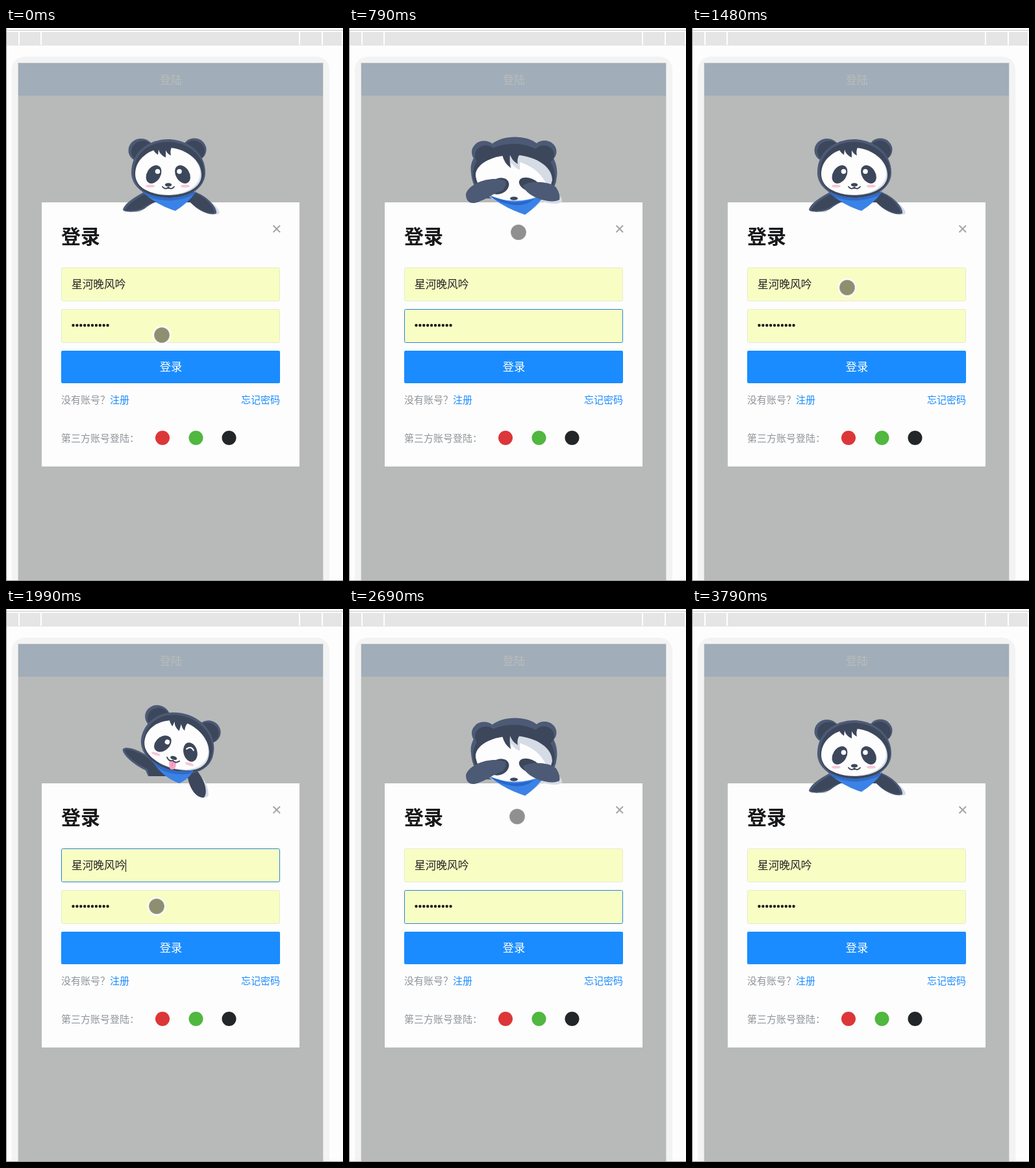
Recreate the animation shown at these times as an HTML page. Size 519 px wide and 850 px high, loop 4.17 s.

```html
<!DOCTYPE html>
<html lang="zh-CN">
<head>
<meta charset="utf-8">
<title>登录</title>
<style>
html, body { margin: 0; width: 100%; height: 100%; overflow: hidden; background: #fdfdfd; }
svg { display: block; width: 519px; height: 850px; }
text { font: 15px "Noto Sans CJK SC", "Noto Sans CJK", sans-serif; fill: #8f9499; }
.blue { fill: #1a8bff; }
.field { fill: #f8fdc3; stroke: #e6ebd0; }
.field.on { stroke: #2685d8; }
.dark { fill: #3d475b; }
.mid { fill: #4c5a75; }
.white { fill: #fdfdfe; }
.scarf { fill: #3b82e6; }
.shade { fill: #d5dce6; }
.pink { fill: #f9c6d8; }
.line { fill: none; stroke: #30394b; stroke-width: 1.7; stroke-linecap: round; }
</style>
</head>
<body>
<svg viewBox="0 0 519 850">
  <defs>
    <g id="skull">
      <ellipse class="mid" cx="208" cy="188" rx="19.5" ry="18"/>
      <ellipse class="mid" cx="290" cy="187" rx="18.5" ry="17.5"/>
      <ellipse class="dark" cx="211" cy="190" rx="18" ry="16.5"/>
      <ellipse class="dark" cx="289" cy="189" rx="17" ry="16"/>
      <path class="mid" d="M193 222C193 189 221 171 250 171S307 191 307 222C307 246 282 262 250 262S193 246 193 222Z"/>
      <path class="dark" d="M197 222C197 191 222 175 250 175S305 194 305 222C305 246 280 261 250 261S197 246 197 222Z"/>
      <path class="shade" d="M202 222C202 200 224 185 250 185S301 202 301 226C301 246 277 257 250 257S202 246 202 222Z"/>
      <path class="white" d="M199 224C199 201 222 184 249 184S299 203 299 223C299 244 276 256 249 256S199 246 199 224Z"/>
      <path class="dark" d="M225 180Q226 190 234 195L235 187Q237 195 246 199L246 188Q249 194 254 196Q252 189 256 181Z"/>
      <ellipse class="dark" cx="227.500" cy="225" rx="10.500" ry="15" transform="rotate(32 227.500 225)"/>
      <ellipse class="dark" cx="272" cy="225" rx="10.500" ry="15" transform="rotate(-32 272 225)"/>
      <circle class="white" cx="233.500" cy="220.500" r="3.800"/>
      <ellipse class="pink" cx="222" cy="243" rx="7" ry="2.300"/>
      <ellipse class="pink" cx="276" cy="243" rx="7" ry="2.300"/>
      <ellipse class="dark" cx="250" cy="241" rx="5.200" ry="2.800"/>
    </g>
  </defs>

  <path fill="#e5e5e5" d="M1 6H519V27H1Z"/>
  <path stroke="#c6c6c6" d="M0 3.500H519"/>
  <path stroke="#fff" stroke-width="2" d="M20 5V26M54 5V26M452 5V26M487 5V26M518 5V26"/>
  <rect x="9" y="44" width="489" height="900" rx="20" fill="#f3f3f3"/>
  <rect x="18.500" y="53.500" width="470" height="900" fill="#b8bab9" stroke="#dedede"/>
  <path fill="#a1adb8" d="M19 54H488V104H19Z"/>
  <text x="254" y="86" text-anchor="middle" style="font-size:17px;fill:#b9bcbd">登陆</text>
  <path stroke="#8d8d8d" d="M.500 0V850M0 849.500H519"/>

  <path fill="#fdfdfd" d="M55 268H452V674H55Z"/>
  <text x="85" y="331" style="font-size:30px;font-weight:700;fill:#17181a">登录</text>
  <path stroke="#a3a5a7" stroke-width="2" d="M411.500 303.500L422 314M422 303.500L411.500 314"/>
  <rect id="user" class="field" x="85.500" y="368.500" width="336" height="51" rx="2"/>
  <text x="101" y="400" style="font-size:16.700px;fill:#222">星河晚风吟</text>
  <rect id="pass" class="field" x="85.500" y="432.500" width="336" height="51" rx="2"/>
  <path fill="none" stroke="#1d1d1d" stroke-width="4.400" stroke-linecap="round" stroke-dasharray="0 5.900" d="M103.500 457H157"/>
  <path id="caret" stroke="#111"/>
  <rect x="85" y="496" width="337" height="50" rx="2" fill="#1a8cff"/>
  <text x="254" y="527" text-anchor="middle" style="font-size:17.300px;fill:#fff">登录</text>
  <text x="85" y="577">没有账号？<tspan class="blue" x="160">注册</tspan></text>
  <text class="blue" x="422" y="577" text-anchor="end">忘记密码</text>
  <text x="85" y="636">第三方账号登陆：</text>
  <circle cx="241" cy="630" r="11" fill="#dc3638"/>
  <circle cx="292.500" cy="630" r="11" fill="#50b73f"/>
  <circle cx="343.500" cy="630" r="11" fill="#232628"/>

  <g id="rest">
    <path class="shade" d="M292 258C315 263 329 277 329 285Q324 289 309 284L188 283Q207 284 222 268Z"/>
    <path fill="#fdfdfd" d="M225 268H287L309 284H205Z"/>
    <path class="mid" d="M213 252C195 261 182 271 180 279C180 284 203 284 213 278Q222 271 229 268H284C298 283 315 289 324 285C326 277 312 260 292 252Z"/>
    <path class="dark" d="M216 254C199 263 188 271 183 280C195 282 207 279 213 275Q222 269 229 268H284C297 280 312 286 321 284C320 275 309 261 292 254Z"/>
    <use href="#skull"/>
    <circle class="white" cx="267" cy="220.500" r="3.800"/>
    <path class="line" d="M241 244Q245 249 250 245Q255 249 259 244"/>
    <path class="scarf" d="M209 251Q250 271 293 251Q283 267 261 281Q231 272 209 251Z"/>
    <path fill="#2e6cc9" d="M209 251Q250 271 293 251L288 257Q250 273 217 258Z"/>
  </g>

  <g id="greet">
    <path class="shade" d="M286 250Q310 257 312 285Q311 291 303 290Z"/>
    <path class="mid" d="M226 231C211 220 188 209 180 215C177 223 199 241 215 248L219 257H257L274 240Z"/>
    <path class="dark" d="M226 234C211 223 191 214 183 216C184 226 203 239 218 246L221 257H257L270 240Z"/>
    <path class="dark" d="M279 253C281 273 291 290 304 290C311 286 309 265 292 246Z"/>
    <g transform="translate(15.500 -11) rotate(17 250 216)">
      <use href="#skull"/>
      <path d="M265 222Q270 215 276 221" fill="none" stroke="#fff" stroke-width="2" stroke-linecap="round"/>
      <path d="M245 246Q250 244 256 246L257 253Q256 259 251 259Q246 257 245 246Z" fill="#f6a5c6"/>
      <path class="line" d="M240 243Q245 249 250 245Q255 249 260 243"/>
      <path stroke="#dc7ca8" d="M251 248V254"/>
    </g>
    <path class="scarf" d="M225 233Q249 254 289 248Q282 261 267 268Q241 259 225 233Z"/>
    <path fill="#2e6cc9" d="M225 233Q249 254 289 248L285 253Q253 258 231 242Z"/>
  </g>

  <g id="cover">
    <path class="shade" d="M301 244Q330 256 328 267Q321 273 297 267L272 287L263 280Z"/>
    <path class="mid" d="M188 222C185 203 199 185 219 179C237 164 273 164 290 178C310 185 323 206 320 229Q318 253 298 262H211Q190 250 188 222Z"/>
    <ellipse class="mid" cx="208" cy="191" rx="19" ry="17.500"/>
    <ellipse class="mid" cx="301" cy="190" rx="18.500" ry="17"/>
    <ellipse class="dark" cx="211" cy="196" rx="17" ry="15.500"/>
    <ellipse class="dark" cx="300" cy="195" rx="16" ry="14.500"/>
    <path class="dark" d="M191 225C191 198 220 178 254 178S317 200 317 229Q315 251 299 260H213Q193 248 191 225Z"/>
    <path class="shade" d="M195 225C197 207 225 195 253 195S313 210 313 234Q308 259 274 268Q250 274 226 265Q197 251 195 225Z"/>
    <path class="white" d="M195 226C196 209 219 198 239 197Q242 211 250 216L250 207Q254 215 263 218L263 206Q291 215 303 238Q303 255 276 264Q251 268 228 262Q198 251 195 226Z"/>
    <path class="dark" d="M224 193Q232 197 236 195Q239 208 249 215Q247 208 248 195Q252 205 260 209Q258 201 263 194L278 198L263 184H237Z"/>
    <path class="scarf" d="M213 255Q250 276 302 256Q290 274 271 287Q237 276 213 255Z"/>
    <path fill="#2866cc" d="M217 258Q234 263 246 267Q259 270 285 263Q270 276 247 271Q232 269 217 258Z"/>
    <ellipse class="dark" cx="254" cy="262" rx="6" ry="2.800"/>
    <ellipse class="dark" cx="231" cy="243" rx="16" ry="12" transform="rotate(-24 231 243)"/>
    <ellipse class="dark" cx="278" cy="241" rx="17" ry="10" transform="rotate(22 278 241)"/>
    <path class="mid" d="M241 235C222 227 187 236 180 255C180 268 188 272 200 267C216 261 222 254 236 250Q243 244 241 235Z"/>
    <path class="mid" d="M268 242C278 234 309 235 319 245Q326 256 324 264C314 270 290 264 278 255Q270 249 268 242Z"/>
  </g>

  <g id="cursor">
    <circle r="13" fill="none" stroke="#fff" stroke-width="2.500"/>
    <circle r="11.500" fill="#000" fill-opacity=".43" stroke="#999" stroke-opacity=".7" stroke-width="1.200"/>
  </g>
</svg>
<script>
const LOOP = 4170;
// time, pose, focused field, caret path
const userCaret = 'M184.5 385V404', passCaret = 'M159.5 448V467';
const states = [
  [0, 'rest', '', ''],
  [370, 'cover', 'pass', passCaret],
  [790, 'cover', 'pass', ''],
  [1170, 'rest', '', ''],
  [1740, 'greet', 'user', userCaret],
  [2270, 'cover', 'pass', passCaret],
  [2690, 'cover', 'pass', ''],
  [2970, 'rest', '', '']
];
// time, x, y: the pointer jumps from stop to stop
const stops = [
  [0, 240, 472], [120, 240, 482], [520, 241, 434], [670, 254, 365],
  [790, 261, 314], [1330, 256, 358], [1480, 239, 399], [1870, 236, 431],
  [1990, 232, 457], [2570, 248, 382], [2690, 259, 319], [3240, 309, 484],
  [3400, 402, 678], [3540, 447, 766], [3670, 486, 838], [3790, 510, 900]
];
const $ = id => document.getElementById(id);
const at = (list, t) => list.findLast(row => row[0] <= t);

function draw(now) {
  const t = now % LOOP;
  const [, pose, focus, caret] = at(states, t);
  const [, x, y] = at(stops, t);
  for (const id of ['rest', 'greet', 'cover']) $(id).style.display = id === pose ? '' : 'none';
  for (const id of ['user', 'pass']) $(id).classList.toggle('on', id === focus);
  $('caret').setAttribute('d', caret);
  $('cursor').setAttribute('transform', `translate(${x} ${y})`);
}
const start = performance.now();
function tick() {
  draw(performance.now() - start);
  requestAnimationFrame(tick);
}
tick();
</script>
</body>
</html>
```
